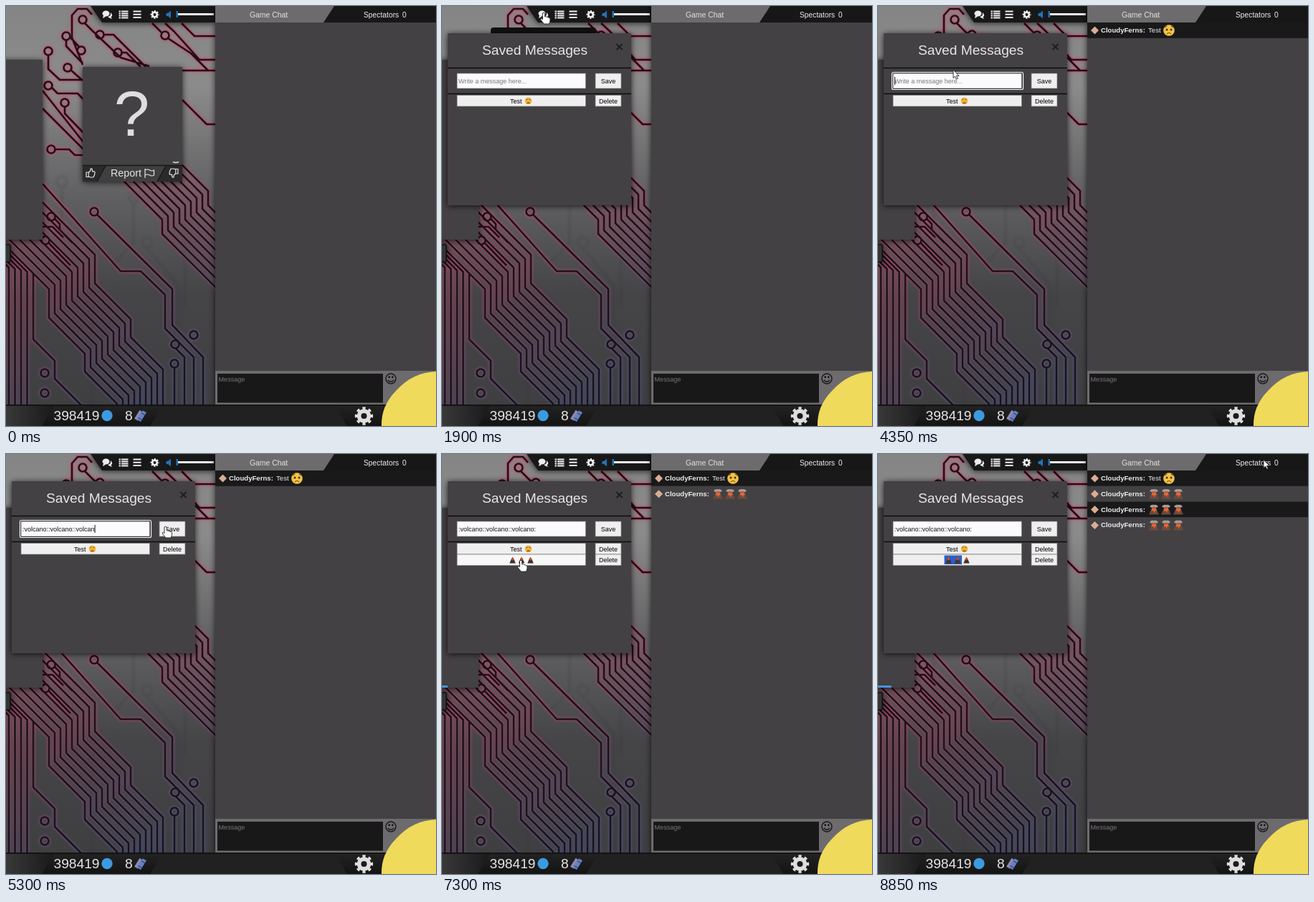
Animation, 600 px wide and 586 px high, one loop 8.9 s. Source, as an HTML page:

```html
<!DOCTYPE html>
<html>
<head>
<meta charset="utf-8">
<style>
html, body { margin: 0; width: 100%; height: 100%; overflow: hidden; background: #434143; }
svg { display: block; }
text { font-family: "Liberation Sans", Arial, sans-serif; white-space: pre; }
.shadow { filter: drop-shadow(0 1px 4px rgba(0,0,0,.75)); }
.line { fill: none; stroke-linejoin: round; }
.btn { fill: #efefef; stroke: #777; stroke-width: .7; }
.small { font-size: 9px; }
.mid { text-anchor: middle; }
</style>
</head>
<body>
<svg width="600" height="586" viewBox="0 0 600 586">
<defs>
  <linearGradient id="wall" x2="0" y2="1">
    <stop offset="0" stop-color="#858585"/><stop offset=".2" stop-color="#8b8b8b"/>
    <stop offset=".48" stop-color="#605f61"/><stop offset=".72" stop-color="#454447"/>
    <stop offset="1" stop-color="#3f3f42"/>
  </linearGradient>
  <linearGradient id="glow" gradientUnits="userSpaceOnUse" x1="60" y1="230" x2="220" y2="530">
    <stop offset="0" stop-color="#c94f70"/><stop offset=".45" stop-color="#9a4a66"/><stop offset="1" stop-color="#4b5680"/>
  </linearGradient>
  <linearGradient id="bar" x2="0" y2="1">
    <stop offset="0" stop-color="#242324"/><stop offset="1" stop-color="#131313"/>
  </linearGradient>
  <linearGradient id="corner">
    <stop offset="0" stop-color="#3a393a"/><stop offset="1" stop-color="#191919"/>
  </linearGradient>
  <filter id="blur" x="-10%" y="-10%" width="120%" height="120%"><feGaussianBlur stdDeviation="1.5"/></filter>
  <clipPath id="left"><rect width="292" height="557"/></clipPath>
  <g id="traces" class="line"></g>
  <g id="gear" fill="none" stroke="currentColor">
    <circle r="6" stroke-width="5"/>
    <circle r="9.2" stroke-width="3.6" pathLength="16" stroke-dasharray="1 1" stroke-dashoffset=".5"/>
  </g>
  <path id="thumb" class="line" stroke="#e4e4e4" stroke-width="1.2"
    d="M-6,-1h3.2v6.5h-3.2zM-2.8,-.5L0,-3.5V-6q3,-.6 2.5,3.8h2.6q1.6,1 .5,2.5q.8,1.3-.4,2.4q.3,1.3-.9,2.1q0,1.2-1.4,1.2H0L-2.8,5"/>
  <g id="volcano">
    <path d="M-7,7L-3,-2H3L7,7Z" fill="#6a4b3d"/>
    <path d="M-3,-2H3L3.6,2 2,1 .8,5-.8,1-2.6,3Z" fill="#ea6a34"/>
    <path d="M-6,-4Q-4,-8 0,-6.500Q4,-8 6,-4Q3,-2 0,-3Q-3,-2 -6,-4Z" fill="#a3a09b"/>
    <path d="M-1.200,-1L-2,-4 0,-3 2,-4 1.200,-1Z" fill="#d64932"/>
  </g>
  <g id="peak">
    <path d="M-4.3,4.5L-1.3,-2.5H1.3L4.3,4.5Z" fill="#43302f"/>
    <path d="M-1.3,-2.5L0,-4.4 1.3,-2.5 2,0 .7,-.5 0,1-.8,-.5-2,0Z" fill="#d24a2c"/>
  </g>
</defs>

<g clip-path="url(#left)">
  <rect width="292" height="557" fill="url(#wall)"/>
  <g class="line" stroke="#333" stroke-width="4" opacity=".14" filter="url(#blur)">
    <path d="M78,252V330M178,275V330L150,360M197,338L240,390V557M250,300V420M20,400V557M120,420V557"/>
    <circle cx="78" cy="245" r="7"/><circle cx="178" cy="268" r="6"/><circle cx="197" cy="330" r="7"/>
  </g>
  <use href="#traces" stroke="url(#glow)" stroke-width="6.5" opacity=".5" filter="url(#blur)"/>
  <use href="#traces" stroke="url(#glow)" stroke-width="4.2" opacity=".55"/>
  <use href="#traces" stroke="#1d1118" stroke-width="2.6"/>

  <rect class="shadow" x="-10" y="75" width="61" height="251" fill="#434143"/>
  <rect id="progress" y="323" height="3" fill="#4a94e0"/>
  <rect class="shadow" x="-12" y="333" width="18" height="24" rx="2" fill="#353435" stroke="#171717" stroke-width="2"/>

  <g class="shadow">
    <rect x="107" y="85" width="139" height="160" fill="#434143"/>
    <rect x="107" y="222" width="139" height="23" fill="#2b2a2b"/>
    <path d="M139,223H223L211,245H127Z" fill="#403f40"/>
  </g>
  <path class="line" d="M107,222.5H246M139,223L127,245M223,223L211,245" stroke="#171717" stroke-width="1.3"/>
  <text class="mid" x="175.5" y="181" font-size="89" fill="#dedede">?</text>
  <path class="line" d="M233,217.5Q237,219.5 241,217.5" stroke="#ddd" stroke-width="1.5"/>
  <text x="146" y="238" font-size="14.3" fill="#e4e4e4">Report</text>
  <path class="line" d="M194,227V240M194,229q3,-2 6.5,0t6,0V236q-3,2-6,0t-6.5,0" stroke="#e4e4e4" stroke-width="1.2"/>
  <use href="#thumb" x="118" y="233"/>
  <use href="#thumb" transform="translate(234 233) rotate(180)"/>

  <path class="shadow" d="M118,0H292V23H134Z" fill="#181818"/>
  <g fill="#eee">
    <ellipse cx="139.5" cy="10.5" rx="5" ry="4"/><path d="M136,13l-1,4 4,-2z"/>
    <path d="M142,15q5,-1 4,-6q4,4 .5,6.5l1.5,2.5-4,-1.5z"/>
  </g>
  <g class="line" stroke="#eee" stroke-width="2">
    <path d="M157.5,7.500h2.5m1,0h9.5m-13,3h2.5m1,0h9.5m-13,3h2.5m1,0h9.5m-13,3h2.5m1,0h9.5"/>
    <path d="M177.5,7.500h11m-11,4.300h11m-11,4.300h11"/>
    <path d="M239,11.500H290" stroke-width="3.2"/>
  </g>
  <use href="#gear" transform="translate(207.5 12) scale(.55)" color="#eee"/>
  <path d="M223.5,10h2.5l4,-3.5v11l-4,-3.5h-2.5z" fill="#2074b8"/>
  <rect x="237.5" y="7" width="2.5" height="9" fill="#2074b8"/>
</g>

<g id="popup">
  <rect id="tip" x="68" y="30" width="147" height="28" rx="4" fill="#111"/>
  <rect class="shadow" x="8" y="38" width="256" height="240" fill="#434143"/>
  <path d="M8,86.5H264M8,122.5H264" stroke="#0d0d0d" stroke-width="1.7"/>
  <text class="mid" x="129.5" y="68" font-size="19.2" fill="#e6e6e6">Saved Messages</text>
  <path d="M243.5,53l8,8m0,-8l-8,8" stroke="#1e1e1e" stroke-width="2"/>
  <rect id="ring" x="19.5" y="92.5" width="183" height="24" rx="2" fill="#111" stroke="#fff" stroke-width="1.2"/>
  <rect x="21" y="94" width="179.5" height="21" fill="#fbfafd" stroke="#777" stroke-width=".7"/>
  <text id="entry" class="small" x="23" y="108"></text>
  <rect id="caret" y="99" width="1" height="11" fill="#111"/>
  <rect class="btn" x="214" y="94" width="36" height="21"/>
  <text class="small mid" x="232" y="108">Save</text>
  <rect id="b0" class="btn" x="21" y="124.5" width="179.5" height="15.5"/>
  <text class="small" x="95" y="135.5">Test</text>
  <circle cx="120.5" cy="132.5" r="4.8" fill="#f2b437"/>
  <path class="line" d="M117,131l2.5,-1M124,131l-2.500,-1M118.5,135.500q2,-2.500 4,0z" stroke="#8a4a22" stroke-width=".9"/>
  <rect class="btn" x="214" y="124.5" width="36" height="15.5"/>
  <text class="small mid" x="232" y="135.5">Delete</text>
  <g id="saved">
    <rect id="b1" class="btn" x="21" y="140" width="179.5" height="15.5"/>
    <rect id="marked" x="92.5" y="141.5" width="24.5" height="12.5" fill="#2d5fc4"/>
    <use href="#peak" x="98.5" y="148"/><use href="#peak" x="111" y="148"/><use href="#peak" x="123.5" y="148"/>
    <rect class="btn" x="214" y="140" width="36" height="15.5"/>
    <text class="small mid" x="232" y="151">Delete</text>
  </g>
</g>

<rect class="shadow" x="292" width="308" height="557" fill="#434143"/>
<g id="chat"></g>
<rect x="292" width="308" height="23" fill="#171717"/>
<path d="M292,0H458L443,23H292Z" fill="#6d6b6d"/>
<text x="340" y="16" font-size="10.4" fill="#e2e2e2">Game Chat</text>
<text x="499" y="16" font-size="10.3" fill="#eee">Spectators</text>
<text x="553" y="16" font-size="10.3" fill="#eee">0</text>

<rect x="292" y="509" width="308" height="48" fill="#6d6b6d"/>
<rect x="295" y="513" width="231" height="40.5" fill="#191819"/>
<text x="296.5" y="524" font-size="9.1" fill="#767676">Message</text>
<g class="line" stroke="#1a1a1a" stroke-width="1.5">
  <circle cx="537" cy="520" r="7"/><path d="M533,522q4,4.5 8,0"/>
</g>
<circle cx="534.7" cy="517.8" r="1.2"/><circle cx="539.3" cy="517.8" r="1.2"/>

<rect y="556.5" width="600" height="30" fill="url(#bar)"/>
<path d="M0,558H67L50,586H0Z" fill="url(#corner)"/>
<path d="M218,558H460L476,586H201Z" fill="#222122"/>
<path d="M0,557H600" stroke="#0d0d0d" stroke-width="1.5"/>
<text x="66.5" y="578" font-size="19.2" fill="#e6e6e6">398419</text>
<circle cx="141" cy="571.5" r="7.7" fill="#3c9be0"/>
<text x="166" y="578" font-size="19.2" fill="#e6e6e6">8</text>
<g transform="translate(187.5 571.5) rotate(-58)">
  <rect x="-8" y="-5" width="14" height="6" fill="#8d86ad"/>
  <rect x="-7" y="-1" width="15" height="6" fill="#6480c0"/>
  <path d="M-4,-1v6M4,-1v6" stroke="#2c4068"/>
</g>
<use href="#gear" transform="translate(499.5 572) scale(1.15)" color="#dedede"/>
<path d="M524,586Q523,558 545,536Q568,511 600,510V586Z" fill="#efda5c"/>

<g id="cursor" stroke="#222" stroke-width=".9" fill="#fff" stroke-linejoin="round">
  <path id="arrow" d="M0,0V11.5l2.6,-2.4 1.8,4 1.9,-.8-1.8,-3.9h3.6z"/>
  <path id="hand" d="M-1.6,0q1.6,-1.6 3.2,0V5q2.3,-.8 2.8,.6q2.1,-.5 2.5,.8q2,-.2 2,1.4V10.5q0,2.7-1.8,4.5H.3q-2,-2.6-4.3,-5.5q-1.2,-2 .9,-2.2l1.5,1.4z"/>
</g>
</svg>
<script>
const $ = id => document.getElementById(id);
const show = (id, on) => $(id).setAttribute("visibility", on ? "inherit" : "hidden");

// Circuit board: single traces, parallel bundles, then the round pads
let d = `M107,82L92,44V13L100,4H113L120,12M110,24L120,34 160,72 200,84M137,40H150L195,85
  M59,68V88L75,103H107M84,47V56L107,80M102,57L90,44M161,65H168L188,85M64,114L72,122H100L120,143
  M90,89L107,104M82,140V150L108,177M51,118L108,190M68,200H88L96,208H108M51,143L108,200
  M222,24L235,36 270,75H292M245,24L263,42H292M204,24L217,37M226,45L258,66 282,90H292
  M246,90H292M246,131L280,165H292M127,291L232,395V445L275,490V557
  M51,248L160,370H188L222,403V450L262,490V557M68,297L75,304V312L92,330M60,331L90,362
  M236,477L249,490V557M235,504V557M51,308H65L80,323`;
for (let k = 0; k < 9; k++) {
  const x = 218 + 8 * k, y = 298 - 5 * k;
  d += `M${x - 100},${y - 100}l100,100v20l90,90`;
}
for (let k = 0; k < 9; k++) {
  const x = 60 + 8 * k, y = 395 - 6 * k;
  d += `M${x - 110},${y - 110}l110,110v40l50,50v25l45,45V557`;
}
for (let k = 0; k < 5; k++) {
  const x = 4 + 8.5 * k, y = 365 + 2 * k;
  d += `M${x - 60},${y - 60}l60,60` + (k < 4 ? "V557" : "V465l30,30V520l37,37");
}
const pads = [[107,19],[59,63],[84,42],[105,62],[131,40],[156,65],[86,86],[59,111],[82,135],[63,200],
  [63,294],[123,287],[55,327],[222,41],[236,472],[262,459],[235,499],[54,512],[54,540]];
$("traces").innerHTML = `<path d="${d}"/>` +
  pads.map(([x, y]) => `<circle cx="${x}" cy="${y}" r="5.5"/>`).join("");

// Chat rows and when each one arrives
const sent = [2700, 6900, 7400, 7750];
const worried = `<circle cx="406" cy="34" r="7.8" fill="#f4c443"/>
  <path class="line" d="M403,39q3,-3 6,0M400,30l3,-2M412,30l-3,-2" stroke="#71451f" stroke-width="1.1"/>
  <circle cx="403" cy="33" r="1.5" fill="#4b2c16"/><circle cx="409" cy="33" r="1.5" fill="#4b2c16"/>`;
$("chat").innerHTML = sent.map((_, i) =>
  `<g id="row${i}" transform="translate(0 ${21.8 * i})">
    <rect x="292" y="23" width="308" height="21.8" fill="${i % 2 ? "#434143" : "#1a191a"}"/>
    <path d="M302.5,28.5l5.5,5.5-5.5,5.5-5.5,-5.5z" fill="#d9ad94"/>
    <text x="311" y="37" font-size="9.6" font-weight="bold" fill="#eee">CloudyFerns:</text>` +
    (i ? [385, 402, 419].map(x => `<use href="#volcano" x="${x}" y="34"/>`).join("")
       : `<text x="377" y="37" font-size="9.6" fill="#eee">Test</text>` + worried) + "</g>"
).join("");

// Pointer path: time, x, y
const path = [[0,612,300],[400,612,300],[900,227,38],[1100,227,38],[1550,142,10],[2000,142,10],
  [2400,112,130],[3200,112,130],[3800,100,103],[4200,100,103],[4350,105,89],[4800,105,89],
  [5400,232,103],[5700,232,103],[6150,138,128],[6500,110,149],[7950,110,149],[8650,538,8],[8900,538,8]];
function pointer(t) {
  const i = path.findIndex(p => p[0] > t), [a, x, y] = path[i - 1], [b, u, v] = path[i];
  const s = (t - a) / (b - a), e = s * s * (3 - 2 * s);
  return [x + (u - x) * e, y + (v - y) * e];
}

const typed = ":volcano::volcano::volcano:";
const OPEN = 1800, FOCUS = 4150, SAVE = 5600;

function draw(t) {
  show("popup", t >= OPEN);
  show("tip", t >= OPEN && t < 2150);
  show("saved", t >= SAVE);
  show("marked", t >= 7500);
  sent.forEach((s, i) => show("row" + i, t >= s));

  const pressed = s => Math.abs(t - s + 40) < 65;
  $("b0").style.fill = pressed(sent[0]) ? "#f7f7f7" : "";
  $("b1").style.fill = sent.slice(1).some(pressed) ? "#f7f7f7" : "";

  const n = Math.max(0, Math.min(typed.length, Math.floor((t - 4450) / 33)));
  const entry = $("entry"), focused = t >= FOCUS && t < SAVE;
  entry.textContent = n ? typed.slice(0, n) : "Write a message here...";
  entry.setAttribute("fill", n ? "#111" : "#777");
  show("ring", focused);
  show("caret", focused && (n > 0 && n < typed.length || (t - FOCUS) % 1000 < 500));
  $("caret").setAttribute("x", 23 + (n ? entry.getComputedTextLength() : 0));
  $("progress").setAttribute("width", Math.max(0, (t - 6200) * .0071));

  const [x, y] = pointer(t);
  const inside = (l, top, r, b) => x > l && x < r && y > top && y < b;
  const hand = inside(134, 4, 190, 20) || t >= OPEN &&
    (inside(21, 124, 200, 156) || inside(214, 94, 250, 115));
  $("cursor").setAttribute("transform", `translate(${x} ${y})`);
  show("arrow", !hand);
  show("hand", hand);
}

let start;
function tick(now) {
  start ??= now;
  draw((now - start) % 8900);
  requestAnimationFrame(tick);
}
draw(0);
requestAnimationFrame(tick);
</script>
</body>
</html>
```
